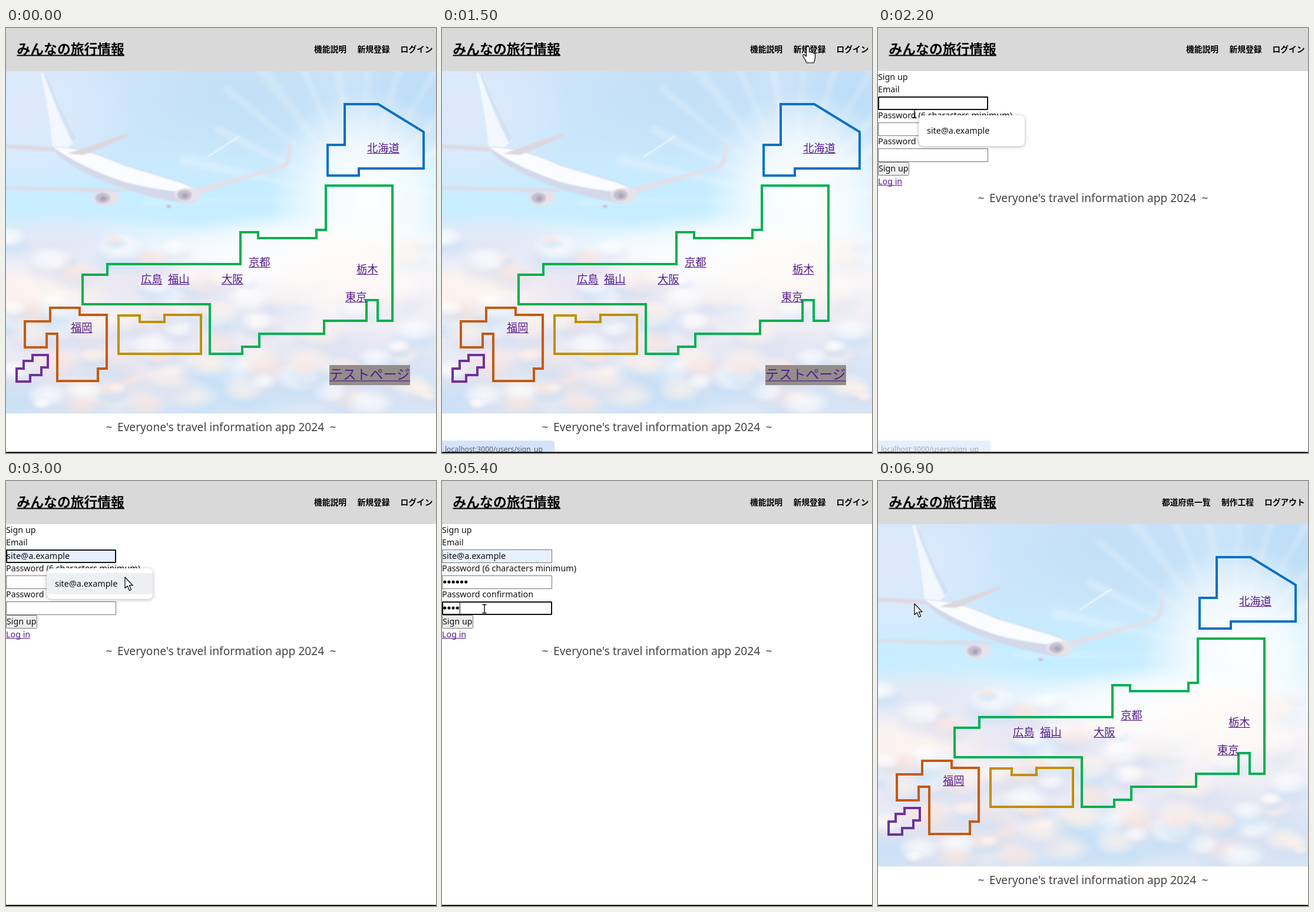
An HTML page with a canvas that plays this animation: 730 px wide and 720 px high, repeating every 7.2 s.

```html
<!DOCTYPE html>
<html lang="ja">
<head>
<meta charset="utf-8">
<title>みんなの旅行情報</title>
<style>
  html, body { margin: 0; width: 100%; height: 100%; overflow: hidden; background: #fff; }
  #stage { position: relative; width: 730px; height: 720px; overflow: hidden; }
  #stage > * { position: absolute; left: 0; top: 0; display: block; }
  text { font-family: "Noto Sans", "Noto Sans CJK JP", sans-serif; white-space: pre; }
  .jp { font-family: "Noto Sans CJK JP", "Noto Sans CJK", sans-serif; }
  #popup { filter: drop-shadow(0 1px 3px rgba(0, 0, 0, .3)); }
</style>
</head>
<body>
<div id="stage">
  <canvas id="sky" width="730" height="720"></canvas>
  <svg id="art" width="730" height="720" viewBox="0 0 730 720"></svg>
</div>
<script>
const LOOP = 7200, STEP = 100;
const MAIL = 'site@a.example';
const VISITED = '#551a8b';
const art = document.getElementById('art');
const sky = document.getElementById('sky');

/* ---------- SVG helpers ---------- */
function add(parent, tag, attrs, content) {
  const el = document.createElementNS('http://www.w3.org/2000/svg', tag);
  for (const k in attrs) el.setAttribute(k, attrs[k]);
  if (content) el.textContent = content;
  parent.appendChild(el);
  return el;
}
const group = (parent, attrs = {}) => add(parent, 'g', attrs);
const box = (parent, x, y, width, height, fill, more = {}) =>
  add(parent, 'rect', { x, y, width, height, fill, ...more });
const label = (parent, x, y, size, str, more = {}) =>
  add(parent, 'text', { x, y, 'font-size': size, fill: '#111', ...more }, str);
const show = (el, on) => { el.style.display = on ? '' : 'none'; };

/* ---------- sky, clouds and plane ---------- */
const ctx = sky.getContext('2d');
let seed = 11;
function rnd() {
  seed = (seed * 16807) % 2147483647;
  return seed / 2147483647;
}

function blob(x, y, rx, ry, rgb, alpha) {
  ctx.save();
  ctx.translate(x, y);
  ctx.scale(1, ry / rx);
  const g = ctx.createRadialGradient(0, 0, 0, 0, 0, rx);
  g.addColorStop(0, `rgba(${rgb},${alpha})`);
  g.addColorStop(.5, `rgba(${rgb},${alpha * .7})`);
  g.addColorStop(1, `rgba(${rgb},0)`);
  ctx.fillStyle = g;
  ctx.fillRect(-rx, -rx, rx * 2, rx * 2);
  ctx.restore();
}

function shape(path, fill, blur = .8) {
  ctx.filter = `blur(${blur}px)`;
  ctx.fillStyle = fill;
  ctx.fill(new Path2D(path));
  ctx.filter = 'none';
}

function paintSky() {
  const W = '255,255,255', CREAM = '255,244,236', LILAC = '218,223,240',
        BLUE = '196,222,246', PINK = '252,230,224', CYAN = '190,236,255';
  ctx.save();
  ctx.beginPath();
  ctx.rect(0, 73, 730, 580);
  ctx.clip();

  const base = ctx.createLinearGradient(0, 73, 0, 653);
  [[0, '#cfe4f9'], [.2, '#cae6fa'], [.34, '#c8ecff'], [.43, '#d3f1ff'], [.52, '#f0f7fd'],
   [.62, '#f6f1f6'], [.8, '#ecebf5'], [1, '#dce8f6']].forEach(s => base.addColorStop(...s));
  ctx.fillStyle = base;
  ctx.fillRect(0, 73, 730, 580);

  blob(30, 150, 190, 150, '226,235,252', .8);
  blob(400, 110, 220, 110, '188,221,246', .65);
  blob(700, 110, 120, 130, '182,218,246', .7);
  blob(330, 300, 200, 50, CYAN, .7);
  blob(60, 310, 170, 45, CYAN, .5);

  // sun rays
  for (let i = 0; i < 15; i++) {
    const a = Math.PI * (.92 + i * .075), w = .012 + rnd() * .03, r = 240 + rnd() * 150;
    const at = d => `${600 + Math.cos(d) * r},${290 + Math.sin(d) * r}`;
    shape(`M600,290L${at(a - w)}L${at(a + w)}Z`, `rgba(255,255,255,${.2 + rnd() * .2})`, 5);
  }
  blob(615, 285, 170, 180, W, 1);

  // cloud bank
  blob(80, 370, 190, 60, '226,229,244', .9);
  blob(230, 430, 200, 50, '229,228,242', .8);
  blob(60, 450, 130, 60, CREAM, .8);
  blob(140, 600, 200, 60, PINK, .5);
  blob(400, 610, 170, 50, BLUE, .8);
  blob(20, 630, 110, 50, BLUE, .8);
  blob(690, 600, 120, 80, BLUE, .5);
  blob(560, 570, 150, 70, LILAC, .6);
  for (let i = 0; i < 120; i++) {
    const x = rnd() * 730, d = rnd(), y = 355 + d * 290, r = 14 + rnd() * 34;
    const fade = x > 420 && y < 470 ? .25 : .6;
    const lit = [W, CREAM, W, PINK][Math.floor(rnd() * 4)];
    const dark = rnd() < .5 + d * .2 ? LILAC : BLUE;
    blob(x + 4, y + r * .35, r * 1.4, r * .7, dark, fade);
    blob(x, y - r * .1, r, r * .6, lit, fade + .15);
  }
  blob(480, 390, 230, 80, W, .8);
  blob(590, 420, 170, 100, '255,250,246', .8);

  // plane
  shape('M0,197L82,202L82,209L0,204Z', '#ddd9e2');
  shape('M0,268L165,271L215,275L160,279L0,273Z', '#dcdde8');
  shape('M58,76L70,77Q92,140 122,187L102,206L79,202Q72,130 58,76Z', '#f3f7fe');
  shape('M70,77Q92,140 122,187L113,194Q86,140 64,77Z', '#d2e2f4');
  shape('M78,201Q130,200 200,232L295,260Q328,271 328,284Q325,298 300,297Q190,276 125,240Q90,222 78,201Z', '#d3d9ea');
  shape('M80,202Q130,201 200,233L290,260Q322,270 326,279Q270,278 205,262Q130,238 80,202Z', '#fbfcff');
  shape('M104,213L204,179L208,182Q160,205 132,215Z', '#ddd6dc');
  shape('M318,273L468,233Q478,226 481,192L484,194Q485,232 474,236L330,280Z', '#e3dfe8');
  for (const [x, y] of [[170, 288], [309, 283]]) {
    shape(`M${x - 23},${y - 6}Q${x},${y - 17} ${x + 22},${y - 7}Q${x + 25},${y + 9} ${x},${y + 14}Q${x - 24},${y + 12} ${x - 23},${y - 6}Z`, '#e6e2ea');
    shape(`M${x - 18},${y}a12,9 0 1 0 24,0a12,9 0 1 0 -24,0Z`, '#c2bdcd', 1.5);
    shape(`M${x - 10},${y + 1}a5,4 0 1 0 10,0a5,4 0 1 0 -10,0Z`, '#a9a5b8', 1);
  }
  shape('M272,300h8v5h-6Z', '#c6c3d2');
  shape('M341,218L396,182L397,184L343,219Z', 'rgba(255,255,255,.8)');
  ctx.restore();
}
paintSky();

/* ---------- pages ---------- */
function link(parent, x, base, size, str, more = {}) {
  label(parent, x, base, size, str, { class: 'jp', fill: VISITED, 'font-weight': 300, ...more });
  box(parent, x, base + size * .1, [...str].length * size, 1.2, VISITED);
}

function footer(parent, y) {
  [[169.5, '~'], [189, "Everyone's travel information app 2024"], [549.5, '~']]
    .forEach(([x, s]) => label(parent, x, y, 19.15, s, { fill: '#444' }));
}

const home = group(art);
[['#0a70c4', '575,129 632,129 709,176 709,238 599,238 599,250 546,250 546,198 575,198'],
 ['#00b050', '543,267 656,267 656,496 631,496 631,461 612,461 612,496 540,496 540,518 430,518 430,540 ' +
   '401,540 401,552 346,552 346,468 130,468 130,418 172,418 172,400 398,400 398,346 428,346 428,356 527,356 527,342 543,342'],
 ['#c09000', '191,487 227,487 227,498 269,498 269,486 331,486 331,552 191,552'],
 ['#c55a11', '75,474 125,474 125,486 171,486 171,577 156,577 156,598 87,598 87,518 69,518 69,541 32,541 32,497 75,497'],
 ['#7030a0', '45,554 71,554 71,575 60,575 60,588 41,588 41,599 18,599 18,577 30,577 30,564 45,564']
].forEach(([stroke, points]) => add(home, 'polygon', { points, stroke, fill: 'none', 'stroke-width': 4 }));
[['北海道', 613, 210], ['京都', 412, 403], ['栃木', 595, 415], ['東京', 576, 462],
 ['広島', 229, 432], ['福山', 275, 432], ['大阪', 366, 432], ['福岡', 110, 514]
].forEach(([s, x, y]) => link(home, x, y, 18.3, s));
const testPage = group(home);
box(testPage, 549, 571, 137, 34, '#938e8b');
link(testPage, 549, 595, 22.85, 'テストページ');
footer(home, 683);

const form = group(art);
const text = (y, s, more) => label(form, 0, y, 14.3, s, more);
text(88, 'Sign up');
text(109, 'Email');
text(153, 'Password (6 characters minimum)');
text(197, 'Password confirmation');
const fields = [116, 160, 204].map(y => ({
  y,
  plain: box(form, .5, y + .5, 186, 22, '#fff', { stroke: '#767676' }),
  ring: box(form, 1, y + 1, 185, 21, 'none', { stroke: '#101010', 'stroke-width': 2, rx: 1 }),
  dots: Array.from({ length: 7 }, (_, i) =>
    add(form, 'circle', { cx: 4.7 + 7.2 * i, cy: y + 11, r: 2.6, fill: '#000' }))
}));
const mail = label(form, 1, 131.5, 14.5, MAIL);
const caret = box(form, 0, 0, 1, 19, '#000');
const button = group(form);
box(button, .5, 227.5, 52, 22, '#efefef', { stroke: '#767676', rx: 1 });
label(button, 1, 242.5, 14.3, 'Sign up');
text(264.5, 'Log in', { fill: VISITED });
box(form, 0, 266, 41, 1, VISITED);
footer(form, 294.5);

const popup = group(art, { id: 'popup' });
box(popup, 69, 148, 180, 52, '#fff', { rx: 8 });
const hover = box(popup, 69, 156, 180, 36, '#eeeff1');
label(popup, 83, 179, 14.4, MAIL, { 'font-weight': 500 });

/* ---------- header, status bar, bottom line ---------- */
box(art, 0, 0, 730, 73, '#d9d9d9');
label(art, 18.5, 43.5, 22.8, 'みんなの旅行情報', { class: 'jp', 'font-weight': 700, fill: '#000' });
box(art, 18.5, 45.5, 182.5, 2, '#000');
function nav(items) {
  const g = group(art);
  items.forEach(([x, s]) => label(g, x, 41, 13.75, s, { class: 'jp', 'font-weight': 700, fill: '#000' }));
  return g;
}
const guestNav = nav([[523, '機能説明'], [596.5, '新規登録'], [669.5, 'ログイン']]);
const userNav = nav([[482, '都道府県一覧'], [583, '制作工程'], [656, 'ログアウト']]);

const status = group(art);
add(status, 'path', { d: 'M0,699H186Q191,699 191,704V720H0Z', fill: '#d3e3fd' });
label(status, 5, 717.5, 12.1, 'localhost:3000/users/sign_up', { fill: '#5a5e66' });
box(art, 0, 718, 730, 2, '#141414');

/* ---------- pointer ---------- */
const pointer = group(art);
const skin = { fill: '#fff', stroke: '#000', 'stroke-width': 1.2, 'stroke-linejoin': 'round' };
const pointers = {
  arrow: add(pointer, 'path', { ...skin, d: 'M0,0V18.5L4.3,14.8L7.5,22.5L10.6,21L7.4,13.7H13Z' }),
  hand: add(pointer, 'path', { ...skin, d: 'M-2.5,2Q0,-2 2.5,2V10Q5,8 6.5,11Q9,9.5 10,12Q12.5,11 12.5,14V20Q12,24 10,28H-2Q-4,23 -8,17Q-9,13 -5.5,14.5L-2.5,17Z' }),
  beam: add(pointer, 'path', { d: 'M-3.5,-7H3.5M0,-7V7M-3.5,7H3.5', stroke: '#000', 'stroke-width': 1.3 })
};

/* ---------- timeline ---------- */
// time, x, y, pointer
const moves = [
  [0, 0, 0, ''], [500, 722, 250, 'arrow'], [800, 634, 52, 'hand'], [900, 631, 41, 'hand'],
  [1300, 621, 31, 'hand'], [1800, 621, 31, 'arrow'], [2100, 62, 145, 'beam'], [2400, 62, 145, 'arrow'],
  [2800, 202, 163, 'arrow'], [4000, 202, 163, 'arrow'], [4200, 72, 215, 'beam'], [4700, 72, 215, 'beam'],
  [4800, 72, 216.5, 'beam'], [6600, 72, 216.5, 'beam'], [6700, 62, 208, 'arrow'], [LOOP, 62, 208, 'arrow']
];
// time, focused field, password dots, confirmation dots, caret
const typing = [
  [0, 0, 0, 0, 0], [3300, 1, 0, 0, 1], [3800, 1, 2, 0, 1], [3900, 1, 4, 0, 1], [4000, 1, 6, 0, 1],
  [4500, 2, 6, 0, 0], [5300, 2, 6, 2, 1], [5400, 2, 6, 4, 1], [5500, 2, 6, 6, 1], [6000, 2, 6, 6, 0],
  [6300, 2, 6, 7, 1]
];
// time, status bar opacity
const fades = [[0, 0], [1100, .5], [1200, 1], [2100, .8], [2200, .55], [2300, .25], [2400, 0]];

const lastIndex = (rows, t) => rows.findLastIndex(r => r[0] <= t);
const between = (t, a, b) => t >= a && t < b;

function render(t) {
  const onForm = between(t, 1800, 6700), loggedIn = t >= 6700;
  show(sky, !onForm);
  show(home, !onForm);
  show(form, onForm);
  show(testPage, !loggedIn);
  show(guestNav, !loggedIn);
  show(userNav, loggedIn);
  status.style.opacity = fades[lastIndex(fades, t)][1];

  show(popup, between(t, 2100, 3200));
  show(hover, t >= 2700);
  const filled = t >= 2700;
  show(mail, filled);
  fields[0].plain.setAttribute('fill', filled ? '#e8f0fe' : '#fff');

  const [, focus, pass, confirm, blink] = typing[lastIndex(typing, t)];
  const counts = [0, pass, confirm];
  fields.forEach((f, i) => {
    show(f.ring, i === focus);
    f.dots.forEach((d, n) => show(d, n < counts[i]));
  });
  show(caret, blink);
  caret.setAttribute('x', 1 + 7.2 * counts[focus]);
  caret.setAttribute('y', fields[focus].y + 2);
  button.style.opacity = t >= 6300 ? .3 : 1;

  const i = lastIndex(moves, t), a = moves[i], b = moves[i + 1] || a;
  const k = a[3] && b !== a ? (t - a[0]) / (b[0] - a[0]) : 0;
  const at = n => a[n] + (b[n] - a[n]) * k;
  pointer.setAttribute('transform', `translate(${at(1)},${at(2)})`);
  for (const name in pointers) show(pointers[name], name === a[3]);
}

const start = performance.now();
function tick(now) {
  const t = Math.max(0, now - start) % LOOP;
  render(Math.floor(t / STEP) * STEP);
  requestAnimationFrame(tick);
}
render(0);
requestAnimationFrame(tick);
</script>
</body>
</html>
```
